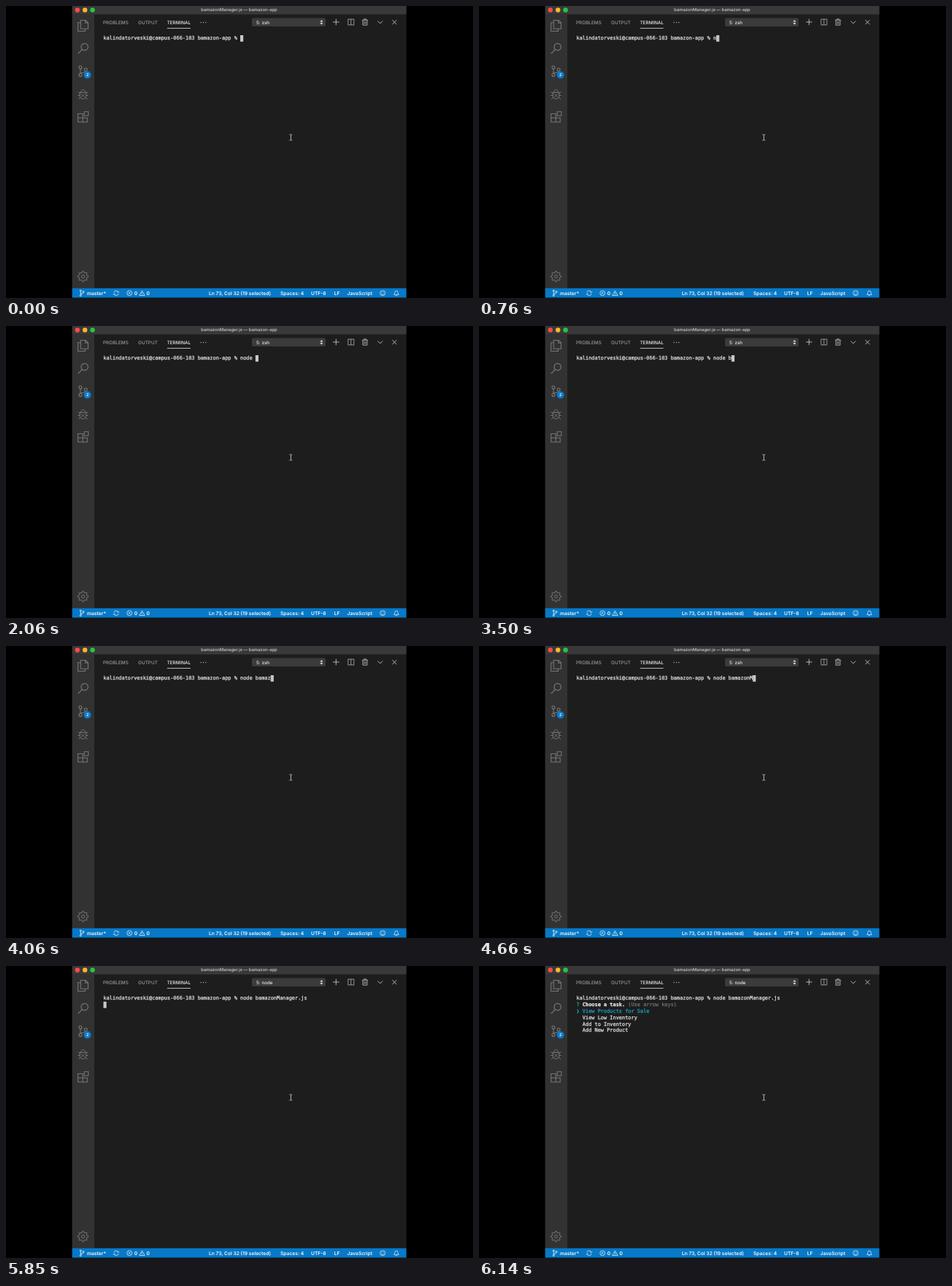
Write an HTML page with a canvas that moves like this. It is 640 px wide and 400 px high and loops after 8000 ms.

```html
<!DOCTYPE html>
<html lang="en">
<head>
<meta charset="utf-8">
<title>Terminal</title>
<style>
  html, body { margin: 0; width: 100%; height: 100%; overflow: hidden; background: #000; }
  canvas { display: block; width: 640px; height: 400px; }
</style>
</head>
<body>
<canvas id="stage" width="640" height="400"></canvas>
<script>
const ctx = document.getElementById('stage').getContext('2d');
const LOOP = 8000;
const UI = 'Inter, "Open Sans", sans-serif';
const MONO = '"DejaVu Sans Mono", "Liberation Mono", monospace';
const CELL = 4.167, ROW = 8.8, LEFT = 133.5, TOP = 44;
const WIN_X = 90.7, WIN_W = 457.9;
const PROMPT = 'kalindatorveski@campus-066-103 bamazon-app % ';
const COMMAND = 'node bamazonManager.js ';
// Key presses; the last one is followed by a tab completion.
const KEYS = [760, 1040, 1660, 1790, 2060, 3500, 3660, 3790, 3910, 4060, 4220, 4340, 4660, 4810];
const COMPLETE = 5260, ENTER = 5720, RENAME = 5850, MENU = 6140;
const ICON = '#767676', TOOL = '#b4b4b4', TEXT = '#e2e2e2';

function rect(x, y, w, h, color) {
  ctx.fillStyle = color;
  ctx.fillRect(x, y, w, h);
}

function disc(x, y, r, color) {
  ctx.fillStyle = color;
  ctx.beginPath();
  ctx.arc(x, y, r, 0, 7);
  ctx.fill();
}

// Strokes SVG path data relative to a centre point.
function icon(x, y, path, color, width = 1) {
  ctx.save();
  ctx.translate(x, y);
  ctx.strokeStyle = color;
  ctx.lineWidth = width;
  ctx.stroke(new Path2D(path));
  ctx.restore();
}

function ring(x, y, r) {
  return `M${x - r} ${y}a${r} ${r} 0 1 0 ${2 * r} 0a${r} ${r} 0 1 0 ${-2 * r} 0`;
}

function label(str, x, y, size, color, weight = 500, align = 'left') {
  ctx.font = `${weight} ${size}px ${UI}`;
  ctx.textAlign = align;
  ctx.fillStyle = color;
  ctx.fillText(str, x, y + size * 0.36);
}

// Terminal text on a fixed grid; a thin outline gives the heavier screen weight.
function term(str, col, row, color = TEXT, weight = 400) {
  ctx.font = `${weight} 6.92px ${MONO}`;
  ctx.textAlign = 'left';
  ctx.fillStyle = ctx.strokeStyle = color;
  ctx.lineWidth = 0.25;
  const y = TOP + 2.4 + row * ROW;
  [...str].forEach((c, i) => {
    const x = LEFT + (col + i) * CELL;
    ctx.fillText(c, x, y);
    ctx.strokeText(c, x, y);
  });
}

function cursor(col, row) {
  rect(LEFT + col * CELL, TOP - 4 + row * ROW, CELL, ROW, '#c8c8c8');
}

function titleBar() {
  rect(WIN_X, 0, WIN_W, 11.5, '#393939');
  disc(97.8, 5.5, 3.2, '#fb4a48');
  disc(108.2, 5.5, 3.2, '#fcb526');
  disc(118.6, 5.5, 3.2, '#28c63f');
  label('bamazonManager.js — bamazon-app', 319.5, 5.3, 5.85, '#d0d0d0', 500, 'center');
}

function gear(x, y) {
  let path = ring(0, 0, 2);
  for (let i = 0; i < 32; i++) {
    const r = i % 4 < 2 ? 7.3 : 5.2, a = (i - 0.5) * Math.PI / 16;
    path += `${i ? 'L' : 'M'}${(r * Math.cos(a)).toFixed(2)} ${(r * Math.sin(a)).toFixed(2)}`;
  }
  icon(x, y, path + 'Z', ICON);
}

function activityBar() {
  rect(WIN_X, 11.5, 121 - WIN_X, 376, '#323232');
  icon(105.5, 27, 'M-3.2 -7.5H3.5L7 -4V4.3H-3.2ZM3.2 -7.5V-3.8H7M-3.2 -4.2H-6.8V7.5H3V4.3', ICON, 1.1);
  icon(105.5, 58, ring(2.2, -2, 4.7) + 'M-1.2 1.5L-6.8 7.3', ICON, 1.2);
  icon(105, 89, ring(-3, -5, 2) + ring(-3, 5.4, 2) + ring(4.2, -2, 2) +
    'M-3 -3V3.4M4.2 0C4.2 3 -1.5 1.5 -3 3.4', ICON, 1.1);
  disc(111.6, 94.4, 5, '#0a7bcc');
  label('2', 111.6, 94.4, 5.4, '#fff', 600, 'center');
  icon(105.5, 121, 'M-4.3 -2.5H4.3V2C4.3 7.7 -4.3 7.7 -4.3 2ZM-3 -2.5C-3 -7.6 3 -7.6 3 -2.5' +
    'M-4.3 -1L-6.6 -3.6M4.3 -1L6.6 -3.6M-4.3 1.5H-7.2M4.3 1.5H7.2M-3.6 4L-6.4 6.8M3.6 4L6.4 6.8' +
    'M-2 -0.4L2 3.6M2 -0.4L-2 3.6', ICON);
  icon(105.5, 152, 'M-6.8 -4.5H-0.2V7H-6.8ZM-6.8 1.2H5.8V7H-0.2M1.7 -7.3H7.3V-1.7H1.7Z', ICON, 1.1);
  gear(105.5, 370.5);
}

function panelHeader(shell) {
  label('PROBLEMS', 133, 22.4, 6.4, '#9a9a9a');
  label('OUTPUT', 181, 22.4, 6.4, '#9a9a9a');
  label('TERMINAL', 220.7, 22.4, 6.3, '#eee');
  rect(220.8, 30, 32, 0.9, '#c8c8c8');
  for (const x of [267.3, 270.6, 273.9]) disc(x, 22.5, 0.75, '#aaa');

  ctx.fillStyle = '#3b3b3b';
  ctx.beginPath();
  ctx.roundRect(337, 16.5, 101, 11.5, 2);
  ctx.fill();
  label('5: ' + shell, 343, 22.4, 6.3, '#eee');
  ctx.fillStyle = '#d8d8d8';
  ctx.fill(new Path2D('M430.4 21.7L432.4 19L434.4 21.7ZM430.4 23.1L432.4 25.8L434.4 23.1Z'));

  icon(452.3, 22, 'M-4.2 0H4.2M0 -4.2V4.2', TOOL);
  icon(472.8, 22, 'M-4 -3.9H4V3.9H-4ZM0 -3.9V3.9', TOOL, 0.8);
  icon(492, 22, 'M-4 -2.7H4M-1.4 -2.7V-4.2H1.4V-2.7M-3 -2.7V4.2H3V-2.7M-1 -1V2.8M1 -1V2.8', TOOL, 0.9);
  icon(512.8, 22.3, 'M-3.4 -1.7L0 1.7L3.4 -1.7', TOOL);
  icon(532.4, 22.2, 'M-3 -3L3 3M3 -3L-3 3', TOOL);
}

function statusBar() {
  const y = 393.3, white = '#f4f9fd', soft = '#d3e7f5';
  const put = (str, x) => label(str, x, y, 6.68, white, 600);
  rect(WIN_X, 386.6, WIN_W, 12.9, '#0679c8');
  icon(104, y, ring(-1.7, -3.2, 1) + ring(-1.7, 3.2, 1) + ring(2, -1.8, 1) +
    'M-1.7 -2.2V2.2M2 -0.8C2 1 -1.7 0.4 -1.7 2.2', white, 0.8);
  put('master*', 111);
  icon(151, y, 'M-3.2 -0.6A3.2 3.2 0 0 1 2.8 -1.6M3.2 0.6A3.2 3.2 0 0 1 -2.8 1.6' +
    'M4.2 -2.2L2.8 -0.6L1 -2M-4.2 2.2L-2.8 0.6L-1 2', soft, 0.8);
  icon(169.2, y, ring(0, 0, 3.4) + 'M-1.5 -1.5L1.5 1.5M1.5 -1.5L-1.5 1.5', soft, 0.8);
  put('0', 175.7);
  icon(186.4, y, 'M0 -3.3L3.7 3.2H-3.7ZM0 -1.2V1.2M0 1.8V2.5', soft, 0.8);
  put('0', 192.6);
  put('Ln 73, Col 32 (19 selected)', 278);
  put('Spaces: 4', 376);
  put('UTF-8', 418);
  put('LF', 449.7);
  put('JavaScript', 467.6);
  icon(516.2, y, ring(0, 0, 3.5) + 'M-1.9 0.9C-1 2.5 1 2.5 1.9 0.9M-1.3 -1.6V-0.6M1.3 -1.6V-0.6', soft, 0.8);
  icon(535, y, 'M-3.3 2.2C-1.5 0.8 -3 -3.3 0 -3.3C3 -3.3 1.5 0.8 3.3 2.2ZM-0.9 3.4H0.9', soft, 0.8);
}

function terminal(t) {
  const typed = t >= COMPLETE ? COMMAND.length : KEYS.filter(k => t >= k).length;
  term(PROMPT + COMMAND.slice(0, typed), 0, 0);
  if (t < ENTER) cursor(PROMPT.length + typed, 0);
  else if (t < MENU) cursor(0, 1);
  else {
    term('?', 0, 1, '#20b67c');
    term('Choose a task.', 2, 1, '#ececec', 700);
    term('(Use arrow keys)', 17, 1, '#707070');
    term('❯ View Products for Sale', 0, 2, '#1ba1c4');
    ['View Low Inventory', 'Add to Inventory', 'Add New Product']
      .forEach((item, i) => term(item, 2, 3 + i));
  }
}

function draw(t) {
  rect(0, 0, 640, 400, '#000');
  rect(WIN_X, 0, WIN_W, 399.5, '#1d1d1d');
  titleBar();
  activityBar();
  panelHeader(t < RENAME ? 'zsh' : 'node');
  terminal(t);
  statusBar();
  icon(390.4, 180, 'M-2 -4C-0.8 -4 0 -3.6 0 -2.8C0 -3.6 0.8 -4 2 -4M0 -2.8V2.8' +
    'M-2 4C-0.8 4 0 3.6 0 2.8C0 3.6 0.8 4 2 4', '#cfcfcf', 0.9);
}

ctx.textRendering = 'geometricPrecision';
const start = performance.now();
function tick() {
  draw((performance.now() - start) % LOOP);
  requestAnimationFrame(tick);
}
tick();
</script>
</body>
</html>
```
